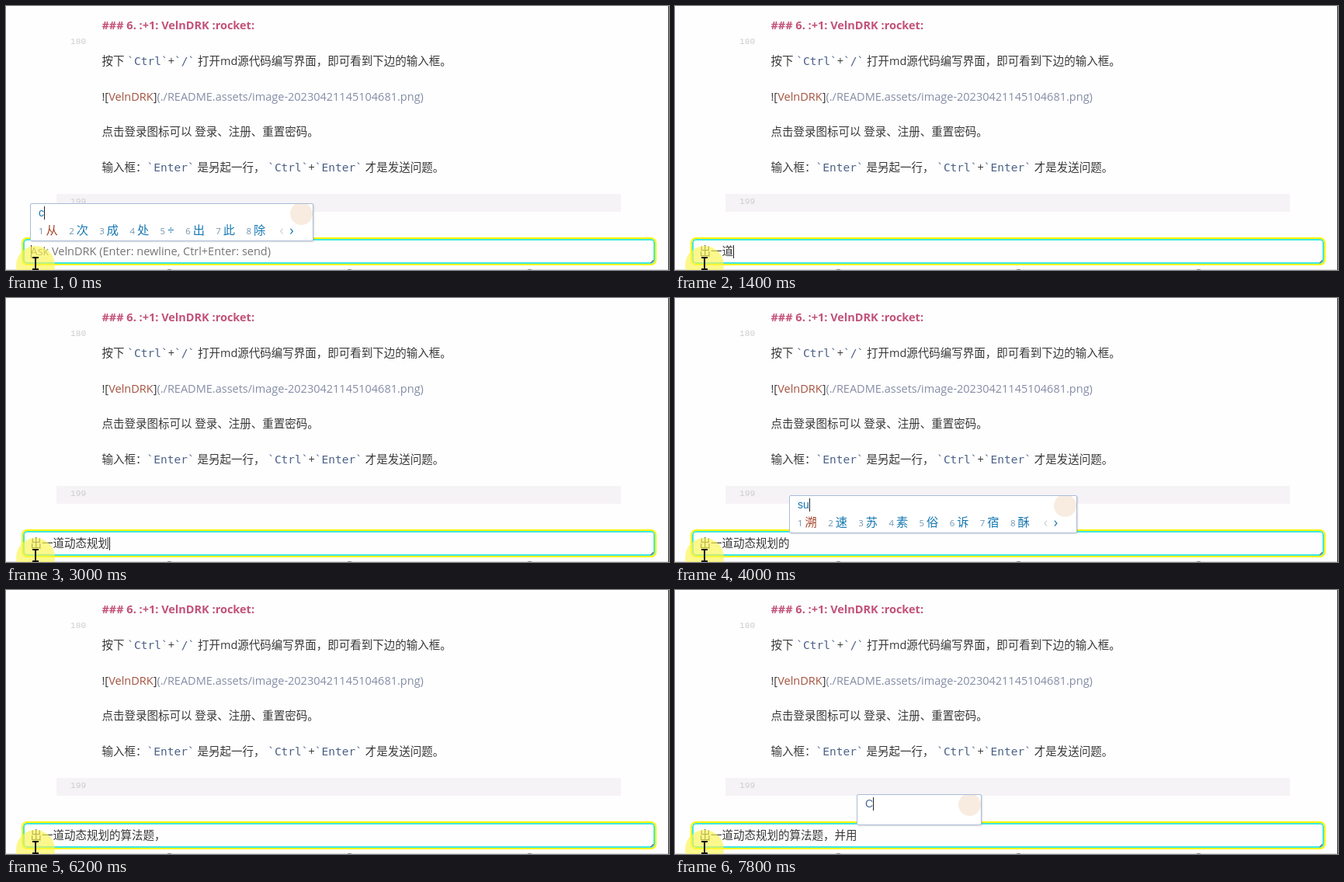
An HTML page for the animation above (8000 ms loop, 854 by 340 pixels).

```html
<!DOCTYPE html>
<html lang="zh">
<head>
<meta charset="utf-8">
<style>
  html, body { margin: 0; width: 100%; height: 100%; overflow: hidden; background: #fefefe; }
  body { position: relative; color: #383838;
    font: 14.5px/20px "Open Sans", "Noto Sans CJK SC", sans-serif; }
  div, i { position: absolute; white-space: pre; box-sizing: border-box; }
  .line { left: 123.5px; }
  h3 { margin: 0; font-size: inherit; color: #c2527a; }
  code { font: 14.5px/1 "DejaVu Sans Mono", monospace; color: #4c6288; }
  .label { color: #a4523f; }
  .path { color: #858da6; }
  .number { left: 83px; color: #cdcdcd; font: 11.3px/20px "Liberation Mono", monospace; }
  #row { left: 65px; top: 242px; width: 727px; height: 23px; background: #f6f3f6; }
  #edge { left: 853px; top: 0; width: 1px; height: 340px; background: #333; }
  #bottom { left: 0; top: 339px; width: 853px; height: 1px;
    background: linear-gradient(90deg, #888 5px, #dedede 5px) 208px 0 / 232px 1px; }
  #field { left: 20px; top: 298px; width: 818px; height: 36px; border: 2px solid #f6f600;
    border-radius: 7px; background: #fefefe; box-shadow: inset 0 0 0 2px #3fe6e0; }
  #grip { left: 829px; top: 326px; width: 5px; height: 5px;
    background: linear-gradient(135deg, transparent 55%, #777 55% 75%, transparent 75%); }
  #typed { left: 31.5px; top: 306px; }
  .caret { display: inline-block; position: static; width: 1px; height: 17px;
    margin-right: -1px; background: #222; vertical-align: -4px; }
  #halo { left: 13px; top: 309px; width: 50px; height: 50px; border-radius: 50%;
    background: rgba(252, 246, 80, .65); }
  #beam { position: absolute; left: 34px; top: 323px; }
  #popup { top: 254px; height: 49px; overflow: hidden; white-space: nowrap; background: #fff;
    border: 1px solid #a9bcd8; border-radius: 2px; box-shadow: 1px 1px 2px #0002; }
  #popup.bare { top: 263px; height: 40px; width: 161px; }
  #badge { right: 0; top: -2px; width: 29px; height: 29px; border-radius: 50%; background: #f8ece1; }
  #preedit { left: 10px; top: 1px; color: #1476b4; font: 14px/20px "Liberation Sans", Arial, sans-serif; }
  .bare #preedit { color: #4b6a94; }
  #choices { position: relative; margin-top: 23px; padding: 0 46px 0 10px;
    font-size: 15.25px; color: #1678b2; }
  #choices span { margin-right: 14.4px; }
  #choices span:first-child { color: #a34428; }
  #choices small { display: inline-block; width: 9.5px; color: #7295ad;
    font: 11.5px/1 "Open Sans", sans-serif; }
  .arrow { top: 23px; font-size: 18px; color: #1678b2; }
  .bare #choices, .bare .arrow { display: none; }
</style>
</head>
<body>
<div id="row"></div>
<div class="line" style="top:15px"><h3>### 6. :+1: VelnDRK :rocket:</h3></div>
<div class="line" style="top:61px">按下 <code>`Ctrl`</code>+<code>`/`</code> 打开md源代码编写界面，即可看到下边的输入框。</div>
<div class="line" style="top:107px">![<span class="label">VelnDRK</span>]<span class="path">(./README.assets/image-20230421145104681.png)</span></div>
<div class="line" style="top:152px">点击登录图标可以 登录、注册、重置密码。</div>
<div class="line" style="top:198px">输入框：<code>`Enter`</code> 是另起一行， <code>`Ctrl`</code>+<code>`Enter`</code> 才是发送问题。</div>
<div class="number" style="top:36px">180</div>
<div class="number" style="top:242px">199</div>
<div id="bottom"></div>
<div id="edge"></div>
<div id="field"></div>
<div id="grip"></div>
<div id="typed"></div>
<div id="halo"></div>
<svg id="beam" width="8" height="17" fill="none" stroke="#111" stroke-width="2">
  <path d="M0 1H3L4 2L5 1H8M4 2V16M0 16H8"/>
</svg>
<div id="popup">
  <div id="badge"></div>
  <div id="preedit"></div>
  <div id="choices"></div>
  <div class="arrow" style="right:37px;color:#ccd3d8">‹</div>
  <div class="arrow" style="right:24px">›</div>
</div>
<script>
const LOOP = 8000, STEP = 200, BLINK = 1000;
const PLACEHOLDER = 'Ask VelnDRK (Enter: newline, Ctrl+Enter: send)';

// [start ms, committed text, pinyin being typed, candidates]
const states = [
  [0, '', 'c', '从 次 成 处 ÷ 出 此 除'],
  [200, '', 'ch', '吃 出 成 处 车 长 场 除'],
  [400, '', 'chu', '出 处 除 初 楚 触 储 厨'],
  [600, '', "chu'yi", '出一 初一 除以 厨艺 处以 刍议 出移 雏衣'],
  [800, '', "chu'yi'd", '出一道 初一的 出一点 除以 初一 厨艺 处以 刍议'],
  [1000, '', "chu'yi'dao", '出一道 出一 初一 除以 厨艺 处以 刍议 出'],
  [1200, '出一道'],
  [2000, '出一道', 'd', '的 都 到 对 但 等 大 点'],
  [2200, '出一道', "d't", '动态 地图 代替 多态 大厅 当天 等他 答题'],
  [2400, '出一道', "d't'g", '动态规 大头 打听 动态 地图 代替 多态 大厅'],
  [2600, '出一道', "d't'g'h", '动态规划 动态 地图 代替 多态 大厅 当天 答题'],
  [3000, '出一道动态规划'],
  [3200, '出一道动态规划', 'd', '的 都 到 对 但 等 大 点'],
  [3400, '出一道动态规划的'],
  [3800, '出一道动态规划的', 's', '是 上 时 说 三 四 水 算'],
  [4000, '出一道动态规划的', 'su', '溯 速 苏 素 俗 诉 宿 酥'],
  [4200, '出一道动态规划的', 'suan', '算 酸 蒜 素 速 苏 诉 宿'],
  [4400, '出一道动态规划的', "suan'f", '算法 酸法 算发 算分 算 酸 蒜 素'],
  [4600, '出一道动态规划的', "suan'fa't", '算法题 算法 算 酸 蒜 素 速 苏'],
  [5000, '出一道动态规划的算法题'],
  [5600, '出一道动态规划的算法题，'],
  [6600, '出一道动态规划的算法题，', 'b', '不 把 被 比 本 并 吧 别'],
  [6800, '出一道动态规划的算法题，', 'bing', '并 病 兵 冰 饼 丙 柄 秉'],
  [7000, '出一道动态规划的算法题，', "bing'y", '并用 病因 并有 冰岩 兵营 并与 并 病'],
  [7200, '出一道动态规划的算法题，并用'],
  [7800, '出一道动态规划的算法题，并用', 'C'],
];

const [typed, popup, preedit, choices] =
  ['typed', 'popup', 'preedit', 'choices'].map(id => document.getElementById(id));
const CARET = '<i class="caret"></i>';
let shownStep = -1;

function draw(time) {
  const [, text, pinyin, words] = states.findLast(state => state[0] <= time);
  const [committedAt] = states.find(state => state[1] === text);
  const caret = (time - committedAt) % BLINK < BLINK / 2 ? CARET : '';

  typed.innerHTML = text ? text + caret : caret + PLACEHOLDER;
  typed.style.color = text ? '#383838' : '#757575';

  popup.style.display = pinyin ? 'block' : 'none';
  if (!pinyin) return;
  popup.className = words ? '' : 'bare';
  popup.style.left = Math.floor(31.5 + 14.5 * text.length) + 'px';
  preedit.innerHTML = pinyin + CARET;
  choices.innerHTML = (words || '').split(' ')
    .map((word, i) => `<span><small>${i + 1}</small>${word}</span>`).join('');
}

function tick() {
  const step = Math.floor(performance.now() % LOOP / STEP);
  if (step !== shownStep) draw((shownStep = step) * STEP);
  requestAnimationFrame(tick);
}
tick();
</script>
</body>
</html>
```
